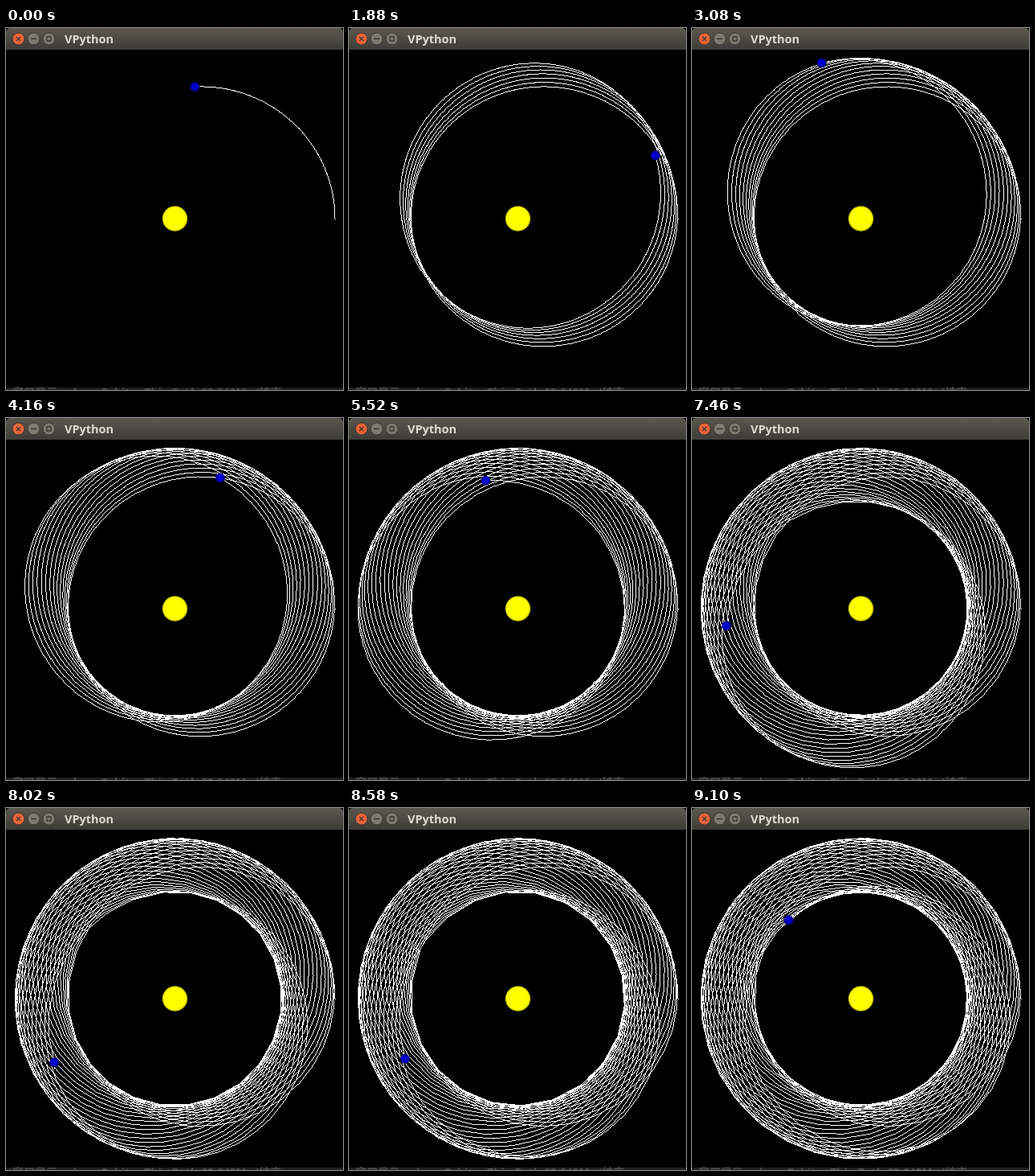
Write an HTML page with a canvas that moves like this. It is 420 px wide and 450 px high and loops after 9.12 s.

```html
<!DOCTYPE html>
<html lang="en">
<head>
<meta charset="utf-8">
<title>VPython</title>
<style>
html, body { margin: 0; width: 420px; height: 450px; overflow: hidden; background: #000; }
canvas { display: block; }
</style>
</head>
<body>
<canvas id="stage" width="420" height="450"></canvas>
<script>
const W = 420, H = 450, LOOP = 9120, TAU = 2 * Math.PI;
const SUN = { x: 210.5, y: 237 };
const ORBIT = { a: 166.25, e: 0.2, advance: 369.4 / 360 };
const MAX_POINTS = 1000, POINTS_PER_TURN = 300;

// [time in ms, radial periods completed]
const PROGRESS = [
  [0, 0.2842], [1880, 6.8424], [4160, 14.748], [5520, 19.709], [5850, 20.885],
  [5990, 22.48], [6900, 25.726], [8020, 29.736], [9100, 33.496]
];

const ctx = document.getElementById('stage').getContext('2d');
const image = ctx.createImageData(W, H);
const pixels = new Uint32Array(image.data.buffer);

// The picture advances every 40 ms, with one stall in the middle
function stepTime(t) {
  if (t < 5800) return Math.floor(t / 40) * 40;
  if (t < 5850) return 5760;
  if (t < 5990) return 5850;
  if (t < 6060) return 5990;
  return Math.min(9100, 6060 + Math.floor((t - 6060) / 40) * 40);
}

function turnsAt(t) {
  let i = 1;
  while (i < PROGRESS.length - 1 && t > PROGRESS[i][0]) i++;
  const [t0, n0] = PROGRESS[i - 1], [t1, n1] = PROGRESS[i];
  return n0 + (n1 - n0) * (t - t0) / (t1 - t0);
}

// Precessing Kepler ellipse, measured from aphelion
function planetAt(turns) {
  const { a, e, advance } = ORBIT;
  const mean = turns * TAU;
  let E = mean;
  for (let i = 0; i < 5; i++) E -= (E + e * Math.sin(E) - mean) / (1 + e * Math.cos(E));
  const beta = e / (1 + Math.sqrt(1 - e * e));
  const anomaly = E - 2 * Math.atan(beta * Math.sin(E) / (1 + beta * Math.cos(E)));
  const r = a * (1 + e * Math.cos(E)), angle = anomaly * advance;
  return { x: SUN.x + r * Math.cos(angle), y: SUN.y - r * Math.sin(angle) };
}

// One-pixel line without antialiasing
function plotLine(p, q) {
  const dx = q.x - p.x, dy = q.y - p.y;
  const n = Math.max(1, Math.ceil(Math.max(Math.abs(dx), Math.abs(dy))));
  for (let i = 0; i < n; i++) {
    pixels[Math.floor(p.y + dy * i / n) * W + Math.floor(p.x + dx * i / n)] = 0xffffffff;
  }
}

function drawTrail(turns) {
  pixels.fill(0xff000000);
  const n = Math.min(MAX_POINTS, Math.ceil(turns * POINTS_PER_TURN));
  let last = planetAt(0);
  for (let i = 1; i <= n; i++) {
    const next = planetAt(turns * i / n);
    plotLine(last, next);
    last = next;
  }
  ctx.putImageData(image, 0, 0);
  return last;
}

function disc(x, y, r, fill, stroke) {
  ctx.beginPath();
  ctx.arc(x, y, r, 0, TAU);
  ctx.fillStyle = fill;
  ctx.fill();
  if (stroke) {
    ctx.strokeStyle = stroke;
    ctx.lineWidth = 1;
    ctx.stroke();
  }
}

function ball({ x, y }, r, stops) {
  const shade = ctx.createRadialGradient(x - r * 0.1, y - r * 0.1, 0, x, y, r);
  stops.forEach(([at, color]) => shade.addColorStop(at, color));
  disc(x, y, r, shade);
}

function drawWindow() {
  const bar = ctx.createLinearGradient(0, 0, 0, 27);
  bar.addColorStop(0, '#5b594f');
  bar.addColorStop(1, '#3c3b37');
  ctx.fillStyle = bar;
  ctx.beginPath();
  ctx.roundRect(0, 0, W, 27, [5, 5, 0, 0]);
  ctx.fill();

  disc(15.5, 13.5, 7.5, '#ea6339', '#37352f');
  disc(34.5, 13.5, 7.5, '#7d7b71', '#37352f');
  disc(53.5, 13.5, 7.5, '#7d7b71', '#37352f');
  ctx.strokeStyle = '#38342d';
  ctx.lineWidth = 1.3;
  ctx.beginPath();
  ctx.moveTo(13, 11); ctx.lineTo(18, 16);
  ctx.moveTo(18, 11); ctx.lineTo(13, 16);
  ctx.moveTo(31, 13.5); ctx.lineTo(38, 13.5);
  ctx.rect(51, 11, 5, 5);
  ctx.stroke();

  ctx.fillStyle = '#dfdbd2';
  ctx.font = 'bold 14.5px "Open Sans", "Noto Sans", sans-serif';
  ctx.fillText('VPython', 73, 19);

  ctx.fillStyle = '#202020';
  ctx.fillRect(0, 447, W, 3);
  ctx.fillStyle = '#4c4c4c';
  ctx.font = 'bold 14px "Noto Sans", "Noto Sans CJK SC", sans-serif';
  ctx.fillText('窗口显示   plane Orbits   Thin Path 62 640M   (结束', 8, 458);
}

let shown = -1;
function frame() {
  const t = stepTime(performance.now() % LOOP);
  if (t !== shown) {
    shown = t;
    const planet = drawTrail(turnsAt(t));
    ball(SUN, 15.7, [[0, '#ffff00'], [0.86, '#ffff00'], [1, '#b4b400']]);
    ball(planet, 6, [[0, '#0000e0'], [0.5, '#0000cc'], [1, '#000078']]);
    drawWindow();
  }
  requestAnimationFrame(frame);
}
frame();
</script>
</body>
</html>
```
